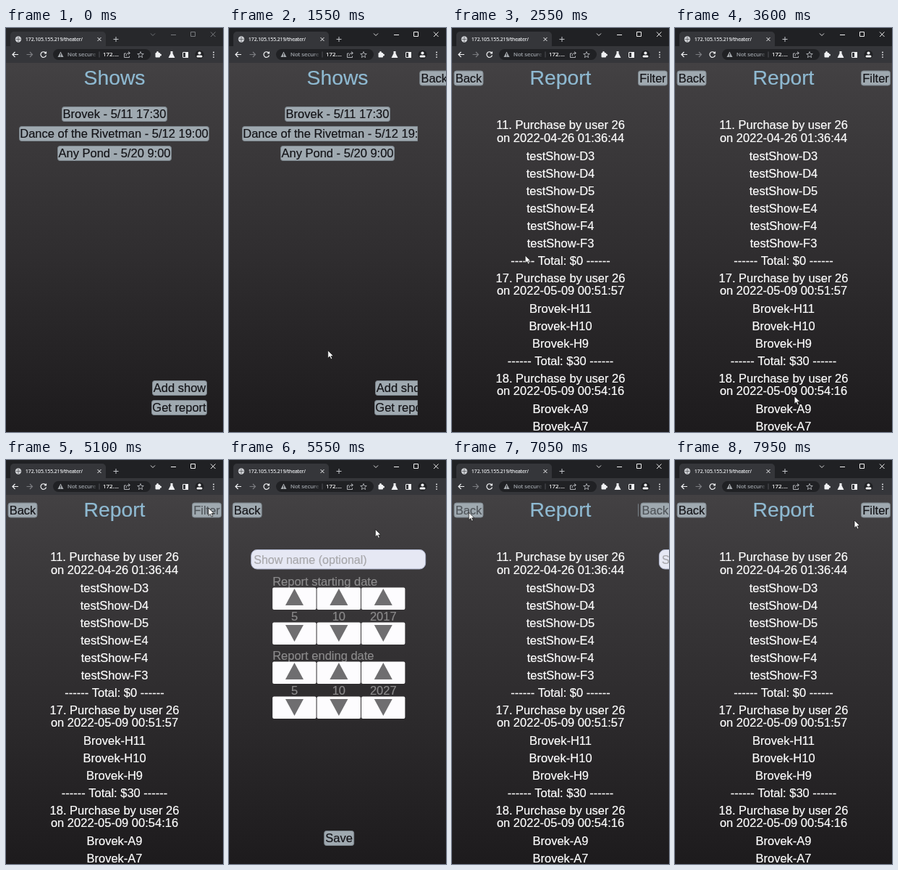
Animation of 300 by 556 pixels, one loop 8 s. Source, as an HTML page with a canvas:

```html
<!DOCTYPE html>
<html lang="en">
<head>
<meta charset="utf-8">
<title>Theater</title>
<style>
  html, body { margin: 0; width: 100%; height: 100%; overflow: hidden; background: #1d1b1d; }
  canvas { display: block; width: 300px; height: 556px; }
</style>
</head>
<body>
<canvas id="stage" width="300" height="556"></canvas>
<script>
const ctx = document.getElementById('stage').getContext('2d');
const W = 300, H = 556, TOP = 48, LOOP = 8000;
const PAGE_FONT = '"Liberation Sans", Arial, sans-serif';
const UI_FONT = '"Open Sans", "Noto Sans", sans-serif';
const ACTIVATED = 1250, SLIDE = 460;
let pointer = [-1, -1];

// ---- drawing helpers ----
function text(str, x, y, { size = 16.5, color = '#ffffff', align = 'center', font = PAGE_FONT } = {}) {
  ctx.font = `${size}px ${font}`;
  ctx.textAlign = align;
  ctx.fillStyle = ctx.strokeStyle = color;
  ctx.fillText(str, x, y);
  // A hairline outline gives the glyphs a little more weight.
  ctx.lineWidth = .2;
  ctx.strokeText(str, x, y);
}

function box(x, y, w, h, r, fill, stroke) {
  ctx.beginPath();
  ctx.roundRect(x, y, w, h, r);
  if (fill) { ctx.fillStyle = fill; ctx.fill(); }
  if (stroke) { ctx.strokeStyle = stroke; ctx.lineWidth = 1; ctx.stroke(); }
}

function shape(points, fill) {
  ctx.beginPath();
  points.forEach(([x, y]) => ctx.lineTo(x, y));
  ctx.closePath();
  ctx.fillStyle = fill;
  ctx.fill();
}

function line(path, color, width = 1) {
  ctx.strokeStyle = color;
  ctx.lineWidth = width;
  ctx.stroke(new Path2D(path));
}

function dot(x, y, r, color) {
  ctx.beginPath();
  ctx.arc(x, y, r, 0, 7);
  ctx.fillStyle = color;
  ctx.fill();
}

function button(label, x, y, w) {
  const [px, py] = pointer;
  const hovered = px > x && px < x + w && py > y && py < y + 21;
  box(x + .5, y + .5, w - 1, 20, 3, '#9fa9b0', '#7a838a');
  text(label, x + w / 2, y + 16.3, { color: hovered ? '#50555a' : '#141418' });
}

const title = str => text(str, 150, 78, { size: 28.3, color: '#8fbad2' });

// ---- pages ----
function showsPage() {
  title('Shows');
  button('Brovek - 5/11 17:30', 77, 108, 146);
  button('Dance of the Rivetman - 5/12 19:00', 18, 135, 263);
  button('Any Pond - 5/20 9:00', 71, 162, 158);
  button('Add show', 202, 485, 76);
  button('Get report', 201, 512, 77);
}

const purchases = [
  [11, '2022-04-26 01:36:44', 'testShow', ['D3', 'D4', 'D5', 'E4', 'F4', 'F3'], 0],
  [17, '2022-05-09 00:51:57', 'Brovek', ['H11', 'H10', 'H9'], 30],
  [18, '2022-05-09 00:54:16', 'Brovek', ['A9', 'A7'], 20],
];

function reportPage() {
  title('Report');
  button('Back', 2.5, 58.5, 41);
  button('Filter', 257, 58.5, 41);
  let y = 139.4;
  const row = (str, gap) => { text(str, 150, y); y += gap; };
  for (const [id, date, show, seats, total] of purchases) {
    row(`${id}. Purchase by user 26`, 17.8);
    row(`on ${date}`, 24.3);
    seats.forEach(seat => row(`${show}-${seat}`, 24));
    row(`------ Total: $${total} ------`, 24);
  }
}

function datePicker(label, year, y) {
  const gray = '#8b8a8b';
  text(label, 58, y + 6, { color: gray, align: 'left' });
  ['5', '10', year].forEach((value, i) => {
    const x = 58 + 61.4 * i, mid = x + 30.3;
    box(x, y + 8.5, 60.4, 30.5, 2, '#fdfcfe');
    box(x, y + 56.5, 60.4, 30.5, 2, '#fdfcfe');
    shape([[mid, y + 10], [mid + 12.5, y + 33], [mid - 12.5, y + 33]], '#6f6e70');
    shape([[mid, y + 83], [mid + 12.5, y + 60], [mid - 12.5, y + 60]], '#6f6e70');
    text(value, mid, y + 54, { color: gray });
  });
}

function filterPage() {
  button('Back', 2.5, 58.5, 41);
  box(28.5, 123.5, 241, 26.5, 8, '#e6e8f4', '#aeb4cc');
  text('Show name (optional)', 32, 142.5, { size: 16.1, color: '#a8a8ac', align: 'left' });
  datePicker('Report starting date', '2017', 167);
  datePicker('Report ending date', '2027', 269);
  button('Save', 129, 510, 42);
}

// The upper page slides in from the right (or back out) and cuts off the lower one.
const slides = [
  { start: 1530, under: showsPage, over: reportPage },
  { start: 5180, under: reportPage, over: filterPage },
  { start: 6830, under: reportPage, over: filterPage, back: true },
];

function drawPart(page, x, w, shift) {
  ctx.save();
  ctx.beginPath();
  ctx.rect(x, TOP, w, H - TOP);
  ctx.clip();
  ctx.translate(shift, 0);
  page();
  ctx.restore();
}

function drawPages(t) {
  const slide = slides.findLast(s => t >= s.start) || slides[0];
  const p = Math.min(1, Math.max(0, (t - slide.start) / SLIDE));
  const eased = 1 - (1 - p) ** 3;
  const edge = W * (slide.back ? eased : 1 - eased);
  drawPart(slide.under, 0, edge, 0);
  drawPart(slide.over, edge, W - edge, edge);
}

// ---- browser frame ----
function drawBrowser(active) {
  const icon = '#f0f1f3', soft = '#c2c5c9', bar = '#35363a';
  const control = active ? '#f0f0f0' : '#77797d';
  ctx.fillStyle = active ? '#202124' : '#27282b';
  ctx.fillRect(0, 0, W, 26);
  box(6, 5, 132, 24, 5, bar);
  ctx.fillStyle = bar;
  ctx.fillRect(0, 25, W, 23);

  dot(17, 15.5, 4.2, '#cfd1d5');
  line('M13.500 15.500h7M17 12v7', bar, .6);
  text('172.105.155.219/theater/', 27, 18, { size: 6.7, color: '#e8eaed', align: 'left', font: UI_FONT });
  line('M126.500 13l5 5m0-5l-5 5', icon);
  line('M148.500 15.500h7m-3.500-3.500v7', soft);

  line('M200 7.500l3 3l3-3', control, .9);
  line('M228 9.500h7', control);
  line('M255.500 5.500h6v6h-6z', control);
  line('M283 5.500l6.500 6.500m0-6.500l-6.500 6.500', control);

  line('M17 36.500h-8m3.500-3.500l-3.500 3.500l3.500 3.500', icon, 1.2);
  line('M28.500 36.500h8m-3.500-3.500l3.500 3.500l-3.500 3.500', '#7b7d81', 1.2);
  line('M55 34.500a3.800 3.800 0 1 0 .5 3M55.500 32.500v2.500h-2.500', icon, 1.2);

  box(65, 29, 135, 15, 7.5, '#202124');
  shape([[75.500, 32.500], [79.500, 40], [71.500, 40]], '#a6aaae');
  line('M75.500 35v2.500m0 .8v1', '#202124', .9);
  const fade = ctx.createLinearGradient(116, 0, 126, 0);
  fade.addColorStop(0, '#a4a9af');
  fade.addColorStop(1, '#a4a9af00');
  text('Not secure', 85, 39.3, { size: 7.8, color: fade, align: 'left', font: UI_FONT });
  line('M129 32.500v8', '#5c5f63', .8);
  text('172....', 134, 39.3, { size: 7.9, color: '#ffffff', align: 'left', font: UI_FONT });

  line('M166 35h-2.500v5.500h7v-2M166 38.500c0-3 2-4 5-4m-2-2l2.500 2l-2.500 2', soft, .9);
  const star = Array.from({ length: 10 }, (_, i) => {
    const r = i % 2 ? 1.9 : 4.5, a = i * Math.PI / 5;
    return `${186 + r * Math.sin(a)} ${37 - r * Math.cos(a)}`;
  });
  line(`M${star.join('L')}Z`, soft, .8);

  box(206.500, 34, 6.500, 6.500, 1, icon);
  dot(209.500, 33.500, 1.500, icon);
  dot(213.500, 37, 1.500, icon);
  shape([[227.500, 32], [230.500, 32], [230.500, 35], [233.500, 41], [224.500, 41], [227.500, 35]], icon);
  box(244.500, 33.500, 7, 7, .5, null, icon);
  ctx.fillStyle = icon;
  ctx.fillRect(248, 33, 4, 8);
  dot(267.500, 36.800, 6, '#202124');
  dot(267.500, 34.500, 2.100, icon);
  box(263.500, 37.500, 8, 3, 1.5, icon);
  for (const y of [33.500, 36.800, 40.100]) dot(287, y, .9, icon);
}

// ---- pointer: [time, x, y] ----
const route = [
  [50, 15, 15], [500, 160, 330], [850, 259, 514], [1250, 250, 521], [1430, 205, 490],
  [1550, 137, 444], [1800, 82, 399], [2300, 92, 380], [2600, 103, 300], [2800, 106, 67],
  [3100, 130, 260], [3400, 151, 449], [3600, 165, 507], [3750, 182, 470], [4000, 150, 67],
  [4250, 121, 305], [4300, 121, 321], [4700, 200, 200], [4950, 286, 63], [5100, 280, 66],
  [5250, 278, 67], [5600, 190, 100], [5850, 132, 128], [6280, 132, 128], [6500, 45, 85],
  [6650, 6, 59], [6900, 7, 60], [7300, 50, 92], [7650, 115, 103], [7700, 122, 102],
  [7850, 200, 75], [7950, 248, 83],
];

function pointerAt(t) {
  if (t < route[0][0]) return [-1, -1];
  const next = route.findIndex(k => k[0] > t);
  if (next < 0) return route.at(-1).slice(1);
  const [t0, x0, y0] = route[next - 1], [t1, x1, y1] = route[next];
  const p = (t - t0) / (t1 - t0);
  return [x0 + (x1 - x0) * p, y0 + (y1 - y0) * p];
}

function drawPointer(t) {
  const [x, y] = pointer;
  if (x < 0) return;
  const overField = t > 5800 && t < 6400 && y > 122 && y < 150;
  ctx.save();
  ctx.translate(x, y);
  if (overField) {
    line('M-2 -4.500h1.500l.5 .5l.5-.5h1.500M0-4v8M-2 4.500h1.500l.5-.5l.5 .5h1.500', '#26262a', .9);
  } else {
    const arrow = new Path2D('M0 0V10.500L2.500 8.200L4.200 12L6 11.200L4.300 7.600H7.600Z');
    ctx.fillStyle = '#ffffff';
    ctx.strokeStyle = '#111111';
    ctx.lineWidth = .7;
    ctx.fill(arrow);
    ctx.stroke(arrow);
  }
  ctx.restore();
}

const backdrop = ctx.createLinearGradient(0, TOP, 0, H);
backdrop.addColorStop(0, '#434143');
backdrop.addColorStop(1, '#1d1b1d');

function frame(now) {
  const t = now % LOOP;
  pointer = pointerAt(t);
  ctx.fillStyle = backdrop;
  ctx.fillRect(0, TOP, W, H - TOP);
  drawPages(t);
  drawBrowser(t >= ACTIVATED);
  drawPointer(t);
}

let startTime;
function tick() {
  const now = performance.now();
  startTime ??= now;
  frame(now - startTime);
  requestAnimationFrame(tick);
}
tick();
</script>
</body>
</html>
```
